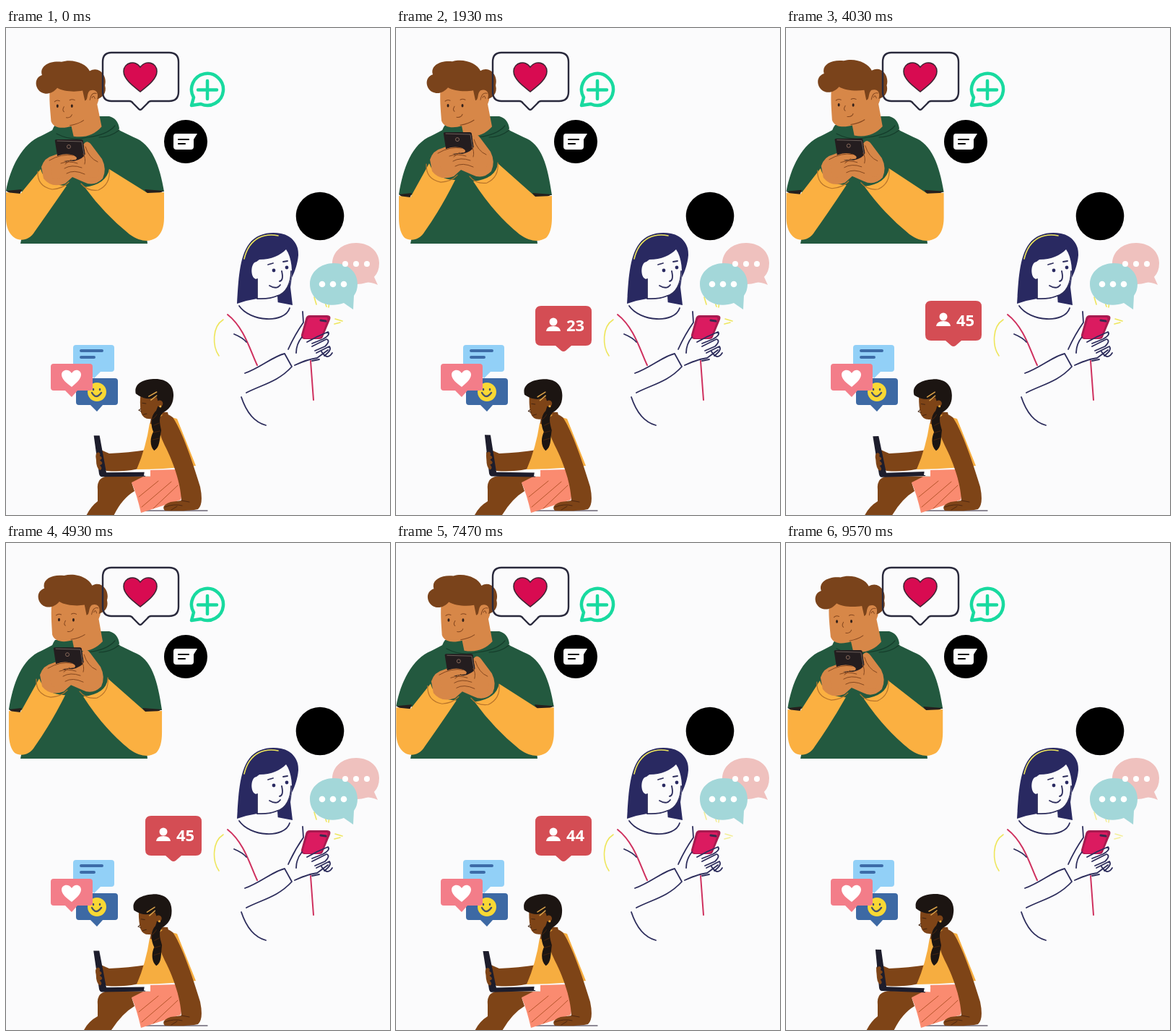
An HTML page for the animation above (9.61 s loop, 532x673 px).

```html
<!DOCTYPE html>
<html lang="en">
<head>
<meta charset="utf-8">
<title>Friends online</title>
<style>
  html, body { margin: 0; width: 100%; height: 100%; overflow: hidden; background: #fbfbfc; }
  svg { display: block; width: 532px; height: 673px; }
  .line { fill: none; stroke-linecap: round; stroke-linejoin: round; }
  .shirt { fill: #23593f; }
  .skin { fill: #d78748; }
  .brown { fill: #7e4417; }
  .navy { stroke: #2d2d5c; stroke-width: 1.8; }
  .pink { stroke: #cf315f; stroke-width: 2; }
  .gold { stroke: #eee65c; stroke-width: 1.6; }
  .crease { stroke: #85471f; stroke-width: 1; }
  .seam { stroke: #153d2b; stroke-width: 1.2; }
  text { font: 700 22px "Open Sans", "Noto Sans", sans-serif; fill: #fff; }
</style>
</head>
<body>
<svg viewBox="0 0 532 673">
  <!-- Man with phone -->
  <g>
    <path id="shirt" class="shirt"/>
    <path id="hems" fill="#251f1d"/>
    <path id="sleeves" fill="#fbb041"/>
    <path class="shirt" d="M66 137Q58 151 78 155L113 154Q150 153 157 139Q155 125 143 122L128 122L92 134L68 134Z"/>
    <path class="line seam" d="M70 146Q91 157 113 151Q140 148 151 135M129 151Q144 151 157 141"/>
    <g id="manHead">
      <path class="skin" d="M62 76C60 98 62 112 63 128C67 139 81 138 91 135L94 149Q118 153 133 136L127 105Q132 95 127 83L110 71Z"/>
      <path fill="#7a431b" d="M50 88C41 83 39 68 51 64C47 52 61 44 78 46C94 41 113 49 117 59C130 51 142 66 138 79C141 90 134 96 127 98C130 89 125 83 117 86C112 90 115 99 110 100L107 86C96 88 80 87 72 82C66 89 58 92 50 88Z"/>
      <path class="line crease" d="M117 99Q119 88 126 90M120 96Q122 91 124 97M81 108Q78 113 81 115M84 123Q90 124 92 119M68 101Q71 98 75 100M89 99Q92 97 96 99M89 134Q101 132 108 127"/>
      <g id="eyes" fill="#33211b"><ellipse cx="72" cy="107" rx="1.5" ry="2.3"/><ellipse cx="92" cy="107" rx="1.5" ry="2.3"/></g>
      <path id="closedEyes" class="line crease" d="M69 107Q72 109 75 107M89 107Q92 109 95 107"/>
    </g>
    <g id="hands">
      <path class="line" stroke="#b8742a" stroke-width="1.2" d="M44 198Q43 219 64 223Q79 222 87 213M143 196Q145 216 128 224Q113 226 104 215"/>
      <path class="skin" d="M49 192Q53 179 66 176L108 160Q112 154 118 161L133 181Q140 195 134 208Q122 220 108 213L92 206L82 215Q63 222 52 208Z"/>
      <path fill="#241d1f" d="M68 157Q67 154 70 154L104 154Q107 154 107 157L111 182Q111 185 107 185L76 186Q73 186 72 183Z"/>
      <path class="line" stroke="#6b5d58" d="M71 156L105 157L109 180"/>
      <circle cx="87" cy="164" r="2.5" fill="none" stroke="#86685a"/>
      <path class="skin" d="M60 183Q76 172 90 175Q101 178 97 182L80 184L97 187Q104 191 99 196L91 205L65 209ZM94 184Q107 181 110 174L108 163Q113 157 118 166L132 184L126 207L99 206Q82 204 80 198Q77 192 86 192L104 192L86 188Q79 183 94 184Z"/>
      <path class="line crease" d="M60 183Q77 173 93 176M76 187Q87 183 99 187M81 194Q91 188 105 193M84 201Q94 195 109 202M110 164Q115 180 127 185M107 174Q111 180 109 188M90 182L82 188"/>
    </g>
  </g>

  <!-- Message icons -->
  <path class="line" stroke="#29293c" stroke-width="2.4" d="M146 34H226Q239 34 239 47V88Q239 101 226 101H201Q198 101 196 104L189 111Q186 115 183 111L176 104Q174 101 171 101H146Q134 101 134 88V47Q134 34 146 34Z"/>
  <path fill="#d80b51" stroke="#3f2433" stroke-width="1.6" d="M186 88C177 81 163 71 163 60C163 47 180 44 186 54C193 44 209 47 209 60C209 71 195 81 186 88Z"/>
  <g class="line" stroke="#18da9f" stroke-width="4.5">
    <path d="M257 107L260 96A22 22 0 1 1 270 105Z"/>
    <path d="M279 73V98M266 85.500H292"/>
  </g>
  <circle cx="249" cy="157" r="30"/>
  <path fill="#fff" d="M235 146H265L260 154V164Q260 168 256 168H236Q232 168 232 164V150Q232 146 235 146Z"/>
  <path class="line" stroke="#000" stroke-width="2.2" d="M239 154H253M239 160H248"/>
  <circle cx="435" cy="260" r="33.300"/>

  <!-- Woman in outline -->
  <g>
    <path fill="#292961" d="M320 381C322 350 323 316 337 298C347 284 366 281 381 284C397 287 406 300 405 314C404 326 400 337 396 345L394 358L397 383L376 379L348 374Q334 376 320 381Z"/>
    <path fill="#fbfbfc" d="M351 320C368 320 380 314 388 306C396 317 398 339 394 351C389 362 383 368 376 370L377 384Q361 395 348 381V347C338 348 338 324 347 323Z"/>
    <path class="line gold" d="M330 319Q335 298 350 290Q362 284 377 287"/>
    <path class="line navy" d="M348 347V374Q365 375 376 370C388 367 395 353 395 336M382 336Q385 349 379 350M365 356Q375 362 380 355M363 327L370 325M384 323L390 322M323 384C338 406 386 409 393 387"/>
    <circle cx="371" cy="335" r="2.400" fill="#292961"/><circle cx="389" cy="331" r="2.400" fill="#292961"/>
    <path class="line pink" d="M307 396C330 414 338 445 348 466M422 460L426 514"/>
    <path class="line gold" d="M301 403C285 413 286 440 295 453"/>
    <path class="line navy" d="M316 423Q328 428 333 434M331 477C352 470 369 454 386 450L396 468C377 489 354 493 333 504M326 510Q337 543 360 549M411 392L412 407Q400 424 391 444M400 466Q417 458 431 456L446 445M424 460L434 458"/>
    <path fill="#a71b50" d="M421 397H445Q451 397 449 403L439 427Q438 430 434 430H413Q408 429 409 424L415 402Q416 397 421 397Z"/>
    <path fill="#db1b60" d="M422 400H443Q447 400 445 404L437 426Q436 429 432 429H415L411 427L418 403Q419 400 422 400Z"/>
    <path class="line" stroke="#3a2a4e" stroke-width="3" d="M436 404L443 405"/>
    <path class="line navy" d="M410 427Q402 437 402 449M417 434Q431 426 446 420Q450 424 439 430L424 436M424 440L444 430Q450 432 442 440L428 446M430 449L448 440Q452 445 441 453M437 447Q445 460 452 449"/>
    <path id="rays" class="line gold" d="M427 372L430 382M442 379L444 385M448 377L447 386M456 402L466 405M455 409L463 407"/>
    <path fill="#efc1be" d="M485 297C504 297 517 309 517 325Q517 337 510 344L515 355Q503 350 499 352C476 359 452 346 452 326C452 309 466 297 485 297Z"/>
    <path fill="#a3d7d9" d="M454 325C474 325 487 337 487 354Q487 363 482 370L481 389L468 380C443 389 421 375 421 354C421 337 436 325 454 325Z"/>
    <g fill="#fff"><circle cx="470" cy="326" r="4"/><circle cx="485" cy="326" r="4"/><circle cx="500" cy="326" r="4"/><circle cx="438" cy="354" r="4.300"/><circle cx="453" cy="354" r="4.300"/><circle cx="468" cy="354" r="4.300"/></g>
  </g>

  <!-- Message cards -->
  <path fill="#92d0f7" d="M97 438H146Q150 438 150 442V471Q150 475 146 475H131L122 484L113 475H97Q93 475 93 471V442Q93 438 97 438Z"/>
  <path class="line" stroke="#3d6ca8" stroke-width="4" d="M104 446H133M104 455H122"/>
  <path fill="#3d69a4" d="M101 484H151Q155 484 155 488V517Q155 521 151 521H134L126 530L117 521H101Q97 521 97 517V488Q97 484 101 484Z"/>
  <circle cx="126" cy="503" r="13" fill="#f8d834"/>
  <path class="line" stroke="#45506a" stroke-width="2.400" d="M119 504Q125 514 132 504M121 499V500M130 499V500"/>
  <path fill="#f37d89" d="M66 464H116Q120 464 120 468V497Q120 501 116 501H99L91 510L82 501H66Q62 501 62 497V468Q62 464 66 464Z"/>
  <path fill="#fff" d="M91 496C84 491 77 485 77 479C77 472 87 470 91 477C95 470 104 472 104 479C104 485 97 491 91 496Z"/>

  <!-- Girl with laptop -->
  <g>
    <path class="line" stroke="#696474" stroke-width="1.300" d="M188 667H279"/>
    <path id="leg" class="brown"/>
    <path fill="#fa8b70" d="M174 628L190 620H200V611L239 610Q246 636 242 652L187 670Q181 644 174 628Z"/>
    <path class="line" stroke="#b6552b" d="M184 648L211 626M188 662L229 627M204 664L238 632"/>
    <path class="brown" d="M126 599L125 587Q128 580 136 585L143 588Q170 587 195 583L204 601Q178 615 139 612Z"/>
    <g id="laptop">
      <path fill="#1d1d2c" d="M122 563H130L139 614H193V620H133Q130 620 129 616Z"/>
      <path fill="#fff" d="M192 612H200V619H191Z"/>
      <path class="brown" d="M125 596Q123 587 128 586Q132 587 130 591Q136 594 130 597Q137 602 130 604Q135 609 130 611Q125 608 125 596Z"/>
    </g>
    <path class="brown" d="M203 530L224 531L230 555L208 562L199 549Z"/>
    <path fill="#f6ad40" d="M199 546Q207 553 214 534L237 540L263 605Q220 610 181 610Q194 580 199 546Z"/>
    <path class="brown" d="M211 541Q219 528 231 538C242 554 255 588 269 634Q274 658 266 665Q251 668 220 667Q214 660 228 655L243 653C242 628 231 598 220 577Q211 560 211 541Z"/>
    <path class="line" stroke="#4f2812" d="M220 662Q233 657 244 660M229 666L237 661M243 653L254 655"/>
    <g id="girlHead">
      <path class="brown" d="M187 502Q185 520 187 531Q190 541 201 540L218 530L217 500Z"/>
      <path fill="#1c1512" d="M180 505C177 491 191 485 207 485C225 485 234 496 232 511Q231 525 217 532C211 539 213 546 215 556C212 571 213 579 205 584C199 578 199 567 204 558C199 546 202 534 208 529Q213 520 209 510Q194 516 180 505Z"/>
      <path class="line" stroke="#dda44a" stroke-width="1.500" d="M198 509L209 503M201 514L209 508"/>
      <circle cx="213" cy="519" r="4.500" class="brown"/><circle cx="214" cy="523" r="1.500" fill="#f6ad40"/>
      <path class="line" stroke="#432410" d="M189 518L194 519M187 526L184 528L188 530M190 534L195 533M201 541Q206 539 209 534M205 549L212 546M204 559L213 557M203 569L212 567"/>
    </g>
  </g>

  <!-- Follower badge -->
  <g id="badge">
    <path fill="#d44d54" d="M201 377H263Q271 377 271 385V424Q271 432 263 432H243L235 439Q232 441 229 439L221 432H201Q193 432 193 424V385Q193 377 201 377Z"/>
    <circle cx="218" cy="399" r="5.500" fill="#fff"/>
    <path fill="#fff" d="M208 412Q209 405 218 405Q227 405 228 412Z"/>
    <text id="count" x="236" y="412">0</text>
  </g>
</svg>
<script>
const LOOP = 9610, CYCLE = 3520, COUNT_TURN = 5450;
const part = id => document.getElementById(id);
const clamp = x => Math.min(1, Math.max(0, x));
const smooth = x => (x = clamp(x), x * x * (3 - 2 * x));
const wave = (t, peak) => smooth((1 + Math.cos((t - peak) / CYCLE * 2 * Math.PI)) / 2);
const move = (id, transform) => part(id).setAttribute("transform", transform);
const shape = (id, d) => part(id).setAttribute("d", d);

function drawMan(t) {
  const lift = wave(t, 1720), lean = wave(t, 1060);
  const left = 4 * lift, right = 219 - 3 * lift, hem = 226 + 5 * lift;
  const wrist = 195 - 8 * lift, shift = left / 2;
  shape("shirt", `M70 138Q57 145 49 149C22 160 ${6 + left} 193 ${left} ${hem - 1}L22 ${hem}L28 258L20 298H196L190 245L${right - 23} ${hem}L${right} ${hem}C${right - 6} 190 202 160 177 151L148 137Z`);
  shape("hems", `M${left} ${hem - 1}L22 ${hem - 3}L17 ${hem + 9}ZM${right} ${hem - 1}L${right - 27} ${hem - 3}L${right - 20} ${hem + 9}Z`);
  shape("sleeves", `M${left} ${hem + 1}L20 ${hem + 3}L${48 - shift} ${wrist}Q54 ${wrist + 22} ${84 - shift} ${wrist + 23}Q62 250 40 281C32 294 20 295 12 290Q${left} 282 ${left} 262Z
    M${right} ${hem + 1}L${right - 23} ${hem + 2}L${143 - shift} ${wrist}Q139 ${wrist + 21} ${109 - shift} ${wrist + 25}Q136 257 171 285C188 297 200 295 208 290Q${right} 282 ${right} 262Z`);
  move("hands", `translate(${-2 * lift} ${-10 * lift})`);
  move("manHead", `translate(${-1 + 2 * lean} ${1 - 1.5 * lean}) rotate(${-1 + 2 * lean} 104 137)`);
  const phase = t % CYCLE, blink = phase > 1420 && phase < 1550;
  part("eyes").style.display = blink ? "none" : "";
  part("closedEyes").style.display = blink ? "" : "none";
}

function drawGirl(t) {
  const nod = smooth(wave(t, 1150)), sway = wave(t, 1250);
  move("girlHead", `rotate(${-4.5 * nod} 211 542)`);
  move("laptop", `rotate(${2 * Math.sin((t - 1650) / CYCLE * 2 * Math.PI)} 160 617)`);
  const foot = 113 - 4 * sway;
  shape("leg", `M127 638Q125 619 145 619L214 620L195 660L174 628L178 640Q161 650 ${foot + 37} 673H${foot - 1}Q${foot + 5} 661 127 654Z`);
}

// The badge counts up to 45, holds, then plays back down.
function drawBadge(t) {
  const u = Math.min(t, 2 * COUNT_TURN - t);
  const enter = smooth((u - 1450) / 800);
  const dip = 2 * Math.exp(-(((t - 6370) / 300) ** 2));
  part("badge").style.opacity = smooth((u - 1450) / 250);
  move("badge", `translate(0 ${20 * (1 - enter) + dip})`);
  part("count").textContent = Math.round(Math.min(45, Math.max(0, 23 + (u - 1930) * 0.0142)));
}

function draw(now) {
  const t = now % LOOP;
  drawMan(t);
  drawGirl(t);
  drawBadge(t);
  part("rays").style.opacity = 0.8 + 0.2 * Math.cos(t / 160);
  requestAnimationFrame(draw);
}
requestAnimationFrame(draw);
</script>
</body>
</html>
```
